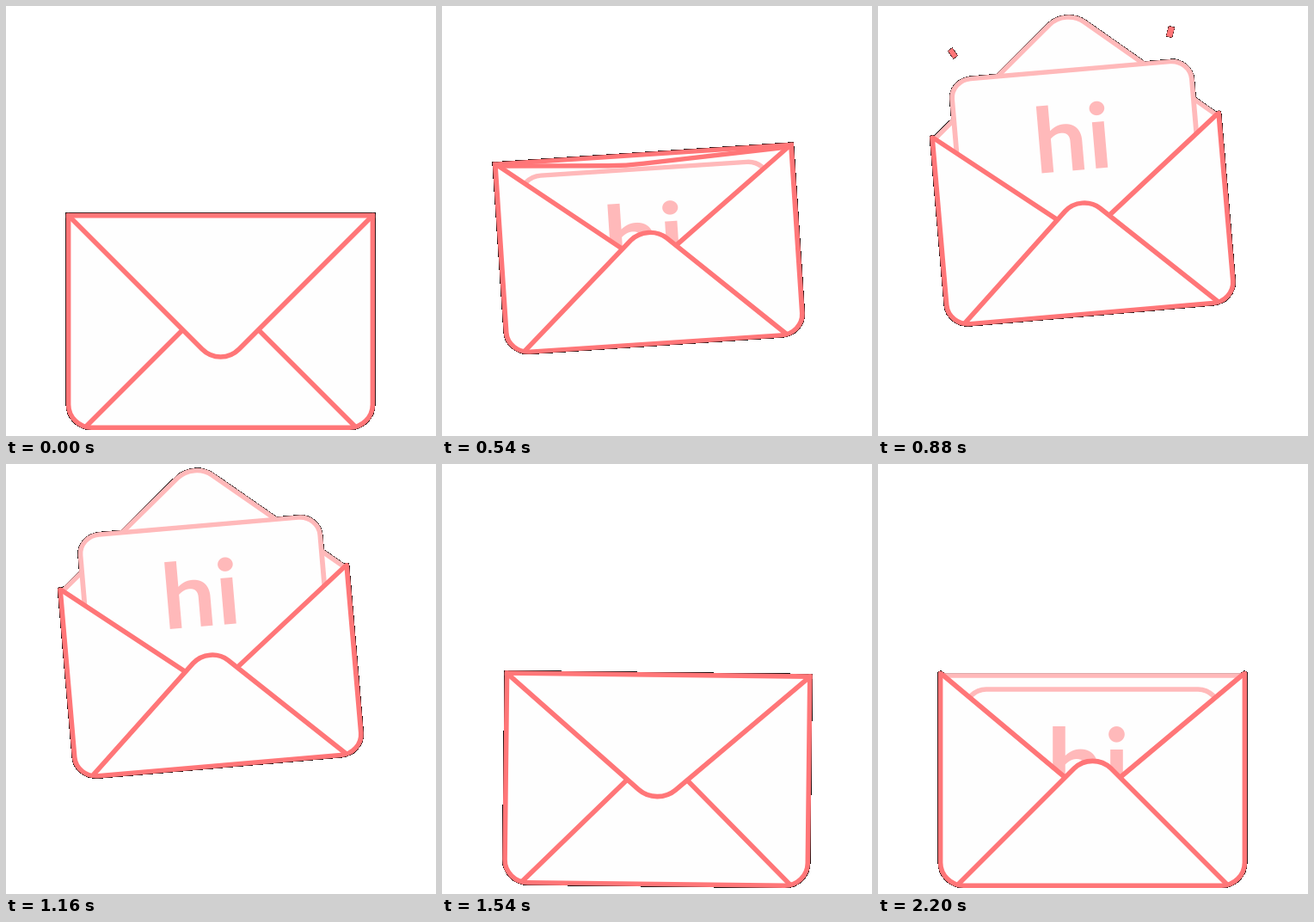
An HTML page with a canvas that plays this animation: 500x500 px, repeating every 2220 ms.

```html
<!DOCTYPE html>
<html lang="en">
<head>
<meta charset="utf-8">
<title>Envelope</title>
<style>
  html, body { margin: 0; width: 100%; height: 100%; overflow: hidden; background: #fff; }
  canvas { display: block; width: 500px; height: 500px; }
</style>
</head>
<body>
<canvas id="stage" width="500" height="500"></canvas>
<script>
const ctx = document.getElementById('stage').getContext('2d', { willReadFrequently: true });
const LOOP = 2220, STEP = 20;
const RED = '#ff7678', PALE = '#ffb9ba', PAPER = '#fefefe';
const LEFT = 72.6, RIGHT = 426.4, TOP = 243.6, BOTTOM = 490.2, MID = 249.5, BASE = 493;
const HINGE = 246;

// [time, value] keys for each moving property
const tracks = {
  lift:   [[0, 0], [540, 98], [880, 133], [1140, 141], [1400, 48], [1580, -2.5], [1740, 0]],
  tilt:   [[0, 0], [540, -3.76], [880, -4.89], [1160, -4.89], [1400, 1.9], [1450, 2], [1640, -0.9], [1740, 0]],
  sx:     [[0, 1], [540, 0.975], [880, 0.945], [1160, 0.945], [1400, 0.961], [1580, 1]],
  sy:     [[0, 1], [540, 0.893], [880, 0.89], [1160, 0.89], [1400, 0.897], [1580, 1]],
  flap:   [[0, 1], [540, 0.06], [860, -0.89], [1160, -0.88], [1400, 0.15], [1600, 1]],
  lean:   [[380, 0], [540, -21], [700, 0]],
  letter: [[540, 0], [860, 91], [1160, 86], [1390, 0]]
};

const confetti = [
  { from: [144, 76], to: [68, 48], angle: -35, w: 6, h: 11 },
  { from: [304, 69], to: [352, 17], angle: 15, w: 7, h: 12 }
];

const mix = (a, b, u) => a + (b - a) * u;

// Monotone cubic interpolation, flat at both ends
function sample(keys, t) {
  const last = keys.length - 1;
  if (t <= keys[0][0]) return keys[0][1];
  if (t >= keys[last][0]) return keys[last][1];
  let i = 0;
  while (t >= keys[i + 1][0]) i++;
  const slope = k => (keys[k + 1][1] - keys[k][1]) / (keys[k + 1][0] - keys[k][0]);
  const tangent = k => {
    if (k === 0 || k === last) return 0;
    const a = slope(k - 1), b = slope(k);
    return a * b <= 0 ? 0 : 2 * a * b / (a + b);
  };
  const [t0, a] = keys[i], [t1, b] = keys[i + 1];
  const d = t1 - t0, u = (t - t0) / d, u2 = u * u, u3 = u2 * u;
  return a * (2 * u3 - 3 * u2 + 1) + b * (3 * u2 - 2 * u3)
    + d * (tangent(i) * (u3 - 2 * u2 + u) + tangent(i + 1) * (u3 - u2));
}

function stroke(color, cap = 'round') {
  ctx.strokeStyle = color;
  ctx.lineCap = cap;
  ctx.lineJoin = 'round';
  ctx.stroke();
}

function fill(color) {
  ctx.fillStyle = color;
  ctx.fill();
}

function line(...pts) {
  ctx.beginPath();
  pts.forEach(([x, y]) => ctx.lineTo(x, y));
}

function bodyPath() {
  ctx.beginPath();
  ctx.moveTo(LEFT, TOP);
  ctx.arcTo(LEFT, BOTTOM, MID, BOTTOM, 27);
  ctx.arcTo(RIGHT, BOTTOM, RIGHT, TOP, 27);
  ctx.lineTo(RIGHT, TOP);
}

function drawConfetti(t) {
  const u = (t - 760) / 240;
  if (u <= 0 || u >= 1) return;
  const e = 1 - (1 - u) ** 2, size = Math.min(1, 2 * (1 - u));
  for (const c of confetti) {
    ctx.save();
    ctx.translate(mix(c.from[0], c.to[0], e), mix(c.from[1], c.to[1], e));
    ctx.rotate(c.angle * Math.PI / 180);
    ctx.scale(size, size);
    ctx.fillStyle = RED;
    ctx.fillRect(-c.w / 2, -c.h / 2, c.w, c.h);
    ctx.restore();
  }
}

function drawFlap(f, lean, color) {
  const y = d => HINGE + f * d;
  ctx.beginPath();
  ctx.moveTo(75, HINGE);
  ctx.lineTo(228 + lean, y(153));
  ctx.bezierCurveTo(240 + lean, y(165), 259 + lean, y(165), 271 + lean, y(153));
  ctx.lineTo(424, HINGE);
  fill(PAPER);
  stroke(color);
}

function drawLetter(up) {
  ctx.save();
  ctx.translate(0, -up);
  ctx.beginPath();
  ctx.roundRect(101, 262, 296, 212, 25);
  fill(PAPER);
  stroke(PALE);
  ctx.font = '700 118px Lato, sans-serif';
  ctx.fillStyle = PALE;
  ctx.fillText('hi', 203 + ctx.measureText('hi').actualBoundingBoxLeft, 393);
  ctx.restore();
}

function drawFront() {
  line([LEFT, TOP], [217, 365], [94, 488], [LEFT, 463]);
  fill(PAPER);
  line([RIGHT, TOP], [282, 365], [405, 488], [RIGHT, 463]);
  fill(PAPER);
  line([75, 245], [217, 364]);
  stroke(RED);
  line([424, 245], [282, 364]);
  stroke(RED);

  ctx.beginPath();
  ctx.moveTo(94, 488);
  ctx.lineTo(228, 354);
  ctx.bezierCurveTo(240, 342.5, 259, 342.5, 271, 354);
  ctx.lineTo(405, 488);
  fill(PAPER);
  stroke(RED);
  bodyPath();
  stroke(RED);
}

// Hard silhouette: soft outer pixels are blended with black, the rest is white
function hardenEdges() {
  const img = ctx.getImageData(0, 0, 500, 500), p = img.data;
  for (let i = 0; i < p.length; i += 4) {
    const a = p[i + 3];
    if (a === 255) continue;
    for (let k = i; k < i + 3; k++) p[k] = a > 10 ? p[k] * a / 255 : 255;
    p[i + 3] = 255;
  }
  ctx.putImageData(img, 0, 0);
}

function draw(t) {
  const s = {};
  for (const name in tracks) s[name] = sample(tracks[name], t);
  if (t >= 2200) s.flap = 0;
  const closed = s.flap > 0;

  ctx.clearRect(0, 0, 500, 500);
  drawConfetti(t);
  ctx.save();
  ctx.translate(MID - Math.min(1, Math.abs(s.tilt)), BASE - s.lift);
  ctx.rotate(s.tilt * Math.PI / 180);
  ctx.scale(s.sx, s.sy);
  ctx.translate(-MID, -BASE);
  ctx.lineWidth = 5.6 * 2 / (s.sx + s.sy);

  bodyPath();
  fill(PAPER);
  if (!closed) drawFlap(s.flap, s.lean, PALE);
  drawLetter(s.letter);
  drawFront();
  if (closed) {
    drawFlap(s.flap, s.lean, RED);
    line([LEFT, TOP], [RIGHT, TOP]);
    stroke(RED, 'square');
  }
  ctx.restore();
  hardenEdges();
}

let shown = -1;
function tick() {
  const t = Math.floor(performance.now() % LOOP / STEP) * STEP;
  if (t !== shown) draw(shown = t);
  requestAnimationFrame(tick);
}
tick();
</script>
</body>
</html>
```
